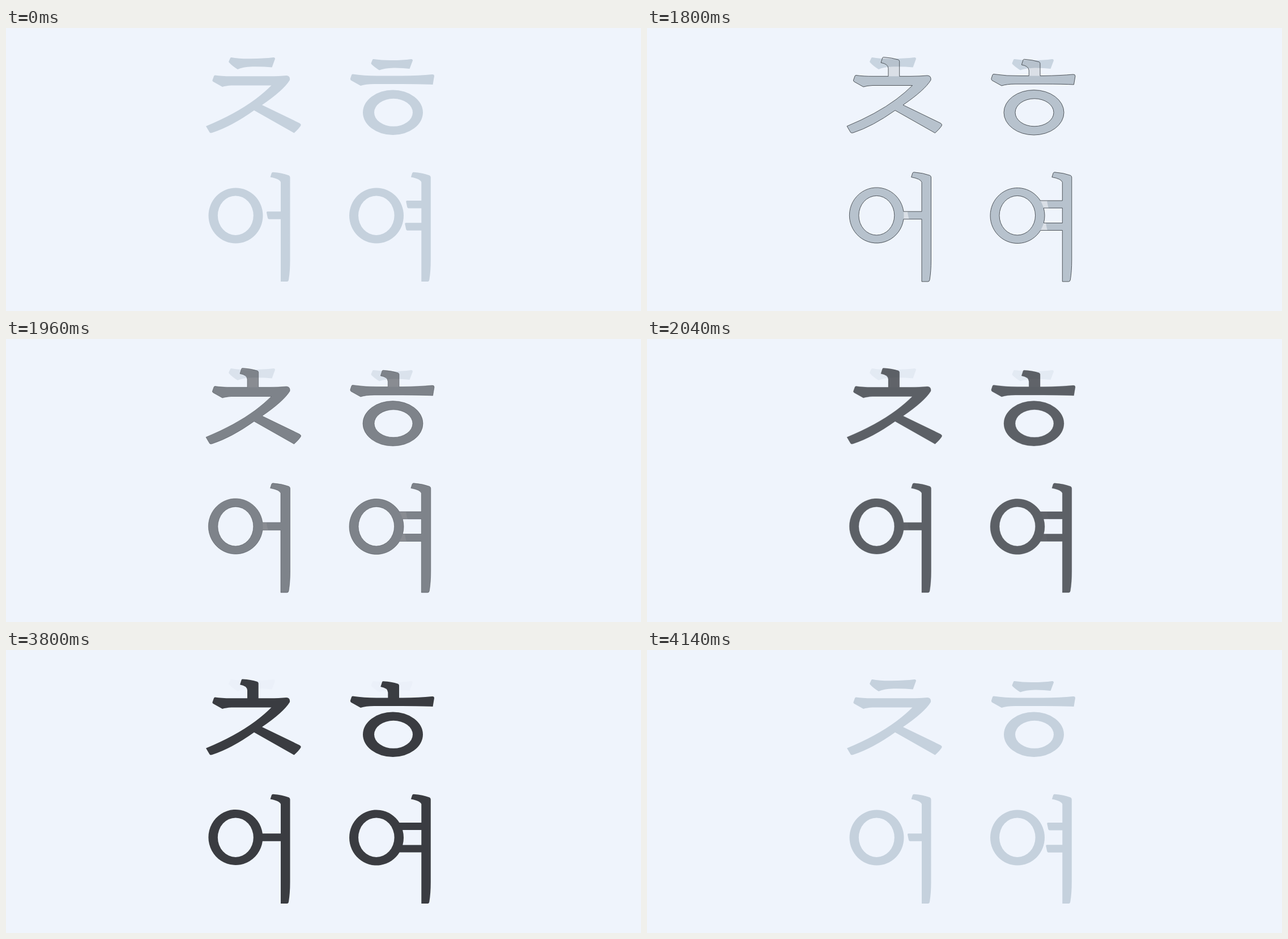
Animation of 1121 by 500 pixels, one loop 4160 ms. Source, as an HTML page:

```html
<!DOCTYPE html>
<html lang="ko">
<head>
<meta charset="utf-8">
<title>Hangul strokes</title>
<style>
  html, body { margin: 0; width: 100%; height: 100%; overflow: hidden; background: #eff4fc; }
  svg { display: block; width: 100vw; height: 100vh; }
  path { fill-rule: evenodd; }
</style>
</head>
<body>
<svg viewBox="0 0 1121 500">
  <path id="plain" fill="#c5d1dd"/>
  <path id="solid" fill="#24272b"/>
  <path id="outline" fill="none" stroke="#42474d"/>
</svg>
<script>
const LOOP = 4160, STEP = 40;

const ellipse = (cx, cy, rx, ry) =>
  `M${cx - rx} ${cy}a${rx} ${ry} 0 1 0 ${2 * rx} 0a${rx} ${ry} 0 1 0 ${-2 * rx} 0Z`;

// Upright tick on top of a horizontal stroke, drawn left to right
const tick = h => `v${-h}q-.5-8-13-10l2.7-8.5q.5-1.5 2.5-1.2q14 .8 25.5 4.5q2 .8 2 3`;

// Long vertical vowel stroke, from its foot round to the inside of its hook
const stem = x => `M${x} 448h11q2.5 0 3-3q2.5-15 2.5-35V264q0-2.5-2-3.5q-12-4.5-28-5.7` +
  `q-2 0-2.6 1.5l-2.3 7.2q16.7 3 18.4 9`;

// Short branch that stops before the ring
const nub = w => `h${1.5 - w}q-1.7 0-1.5 2l2 9.5q.4 1.7 2 2h${w - 4}`;

const chieut = top => `M369 83.5Q382 85.5 400 85.3H426${top}V85.3H465Q482 85.2 495 84
  Q502 84.5 501 92Q490 110 452 136L518 168Q522 170 520 173Q516 179 508.5 185.5L438 145.5
  Q398 174 364 185Q361 186 359.5 184.5L353 173.5Q405 152 440 126Q456 114 468.5 101.5
  H398Q388 102 382 104L366 95Q364 94 364.5 92L367 85Q367.5 83.5 369 83.5Z`;

const hieut = top => `M612 81.5Q635 85 660 84.5H674.3${top}V84.5H700Q730 84 752 82
  Q756 81.5 756 85L753.5 100Q735 99 700 99H650Q635 99 626 102L609 92.5
  Q607.5 91 608 89L610 83Q610.5 81.5 612 81.5Z` +
  ellipse(683, 149.3, 53, 39.7) + ellipse(684, 149.3, 34, 24.5);

const chieutBar = `M398 52Q412 54.6 432 54.3Q455 54 472 52Q475 51.7 475 54.5L469.5 69.5
  Q455 68 435 68.3Q417 69 409 73Q399 67 393.5 60.5Q393 59.5 393.5 58.5L396 53Q396.7 51.8 398 52Z`;
const hieutBar = `M649 55Q664 57.3 682 57Q700 57 715 55Q718 54.7 718 57.5L712.5 72
  Q700 70.3 684 70.5Q668 71 659 74.5Q650 69 644.8 63.5Q644.3 62.5 644.8 61.5L647 56Q647.7 54.8 649 55Z`;

const innerRings = ellipse(405.3, 331.2, 31.5, 34.8) + ellipse(653.8, 331.2, 31.8, 34.8);

const before = chieut('') + chieutBar + hieut('') + hieutBar +
  ellipse(405.5, 331.5, 48, 49) + ellipse(654, 331.5, 48, 49) + innerRings +
  stem(485) + `V324.2${nub(25)}Z` +
  stem(733.3) + `V305${nub(27)}V344.3${nub(29)}Z`;

const after = chieut(tick(14)) + hieut(tick(9.5)) + innerRings +
  stem(485) + 'V324.2H452.9A48 49 0 1 0 452.9 337.7H485Z' +
  stem(733.3) + 'V305H694.4A48 49 0 1 0 694.7 357.5H733.3Z' +
  'M700.1 318H733.3V344.5H700.3A48 49 0 0 0 700.1 318Z';

const [plain, solid, outline] = ['plain', 'solid', 'outline'].map(id => document.getElementById(id));
plain.setAttribute('d', before);
solid.setAttribute('d', after);
outline.setAttribute('d', after);

const fade = (t, start, steps) =>
  Math.min(1, Math.max(0, (Math.floor((t - start) / STEP) + 1) / steps));

function draw() {
  const t = performance.now() % LOOP;
  const trace = fade(t, 560, 11), fill = fade(t, 1800, 10), reset = fade(t, 3800, 9);
  plain.style.opacity = 1 - fill + reset;
  solid.style.opacity = fill - reset;
  outline.style.opacity = trace - fill;
  requestAnimationFrame(draw);
}
draw();
</script>
</body>
</html>
```
